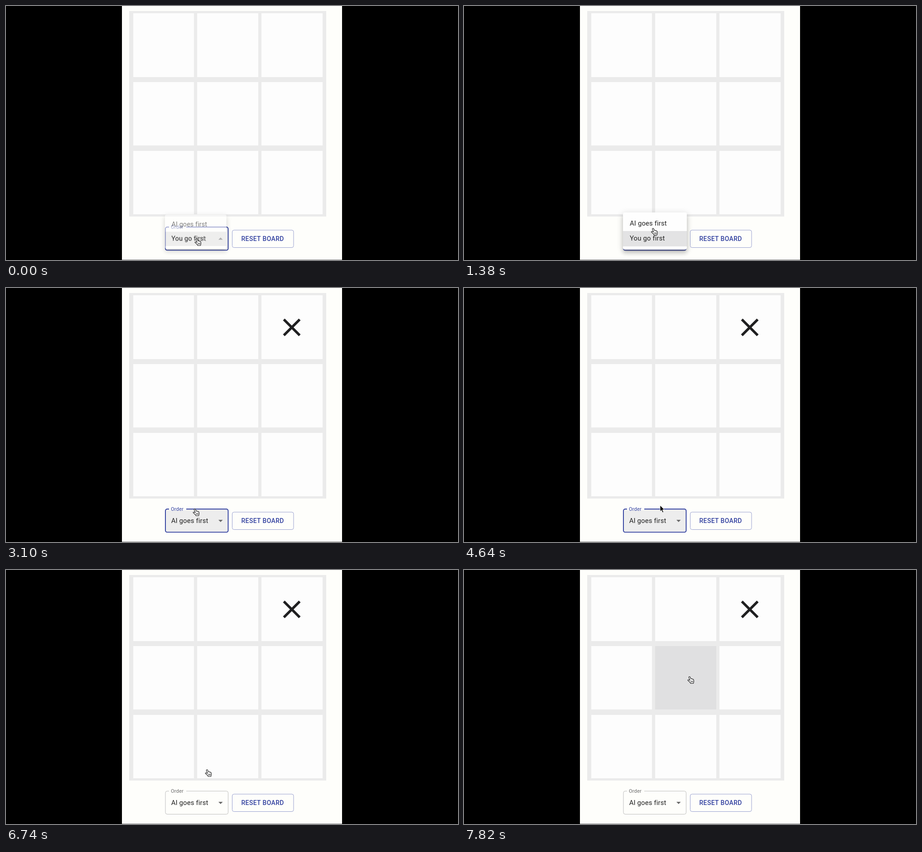
An HTML page for the animation above (8 s loop, 998x561 px).

```html
<!DOCTYPE html>
<html lang="en">
<head>
<meta charset="utf-8">
<title>Tic-tac-toe</title>
<style>
  html, body { margin: 0; width: 100%; height: 100%; overflow: hidden; background: #000; }
  svg { position: absolute; left: 0; top: 0; }
  text, #menu { font: 14.9px Roboto, sans-serif; letter-spacing: .14px; fill: #212121; color: #212121; }
  #label { font-size: 11.15px; letter-spacing: .1px; }
  #reset { font-size: 13.95px; font-weight: 500; letter-spacing: .4px; fill: #303f9f; }
  #menu {
    position: absolute; left: 351px; top: 456px; width: 140.5px; height: 74.5px;
    padding: 7.5px 0 0; box-sizing: border-box; height: 82px;
    background: #fefefe; border-radius: 4px; transform-origin: 0 62px;
    box-shadow: 0 5px 5px -3px rgba(0,0,0,.2), 0 8px 10px 1px rgba(0,0,0,.14), 0 3px 14px 2px rgba(0,0,0,.12);
  }
  #menu div { height: 33.5px; line-height: 33.5px; padding-left: 15px; white-space: nowrap; }
  #menu .selected { background: #e3e3e4; }
</style>
</head>
<body>
<svg width="998" height="561">
  <rect x="256" width="486" height="560" fill="#fefefb"/>
  <rect x="256" y="560" width="486" height="1" fill="#8a8a8a"/>
  <rect x="272" y="11" width="435" height="454" fill="#ebebeb"/>
  <g id="cells"></g>
  <path id="mark" d="M613.5 69.5l35 35m0-35l-35 35" stroke="#1f1f20" stroke-width="5.6"/>
  <rect id="tint" x="352" y="488" width="138.5" height="51.5" rx="4" fill="#ededed"/>
  <path id="outline" fill="none" d="M398 488.3H486.5a4 4 0 0 1 4 4V535.4a4 4 0 0 1-4 4H356a4 4 0 0 1-4-4V492.3a4 4 0 0 1 4-4H360"/>
  <rect x="360" y="486" width="38" height="5" fill="#fefefb"/>
  <text id="label" x="364" y="492">Order</text>
  <text id="choice" x="364.7" y="519.2"></text>
  <path id="caret" fill="#6b6b6b"/>
  <rect x="499.5" y="495" width="135.5" height="38.5" rx="4" fill="none" stroke="#979fcf"/>
  <text id="reset" x="519.5" y="519.2">RESET BOARD</text>
</svg>
<div id="menu"><div>AI goes first</div><div class="selected">You go first</div></div>
<svg width="998" height="561">
  <g id="hand" stroke="#111" stroke-linejoin="round" stroke-linecap="round">
    <path fill="#fff" stroke-width="1.1" d="M.8 0Q-1 0-.5 2L2 8.3-.5 7.3Q-3.6 6.6-2.6 8.6L2.6 13 3 15H9.6L10 13Q11 10.5 10 7Q9.5 5.5 8.2 6Q7.6 4.6 6 5.3Q5.2 4 3.9 4.8L2.4 1Q1.9 0 .8 0Z"/>
    <path fill="none" stroke-width=".8" d="M4 9.5l.5 3M6 9.3l.3 3.2M7.9 9.2l.2 3.3"/>
  </g>
  <path id="arrow" stroke="#fff" stroke-width=".9" d="M0 0V13.5L3 10.7 5.3 16 7.6 15 5.3 10 9.3 9.6Z"/>
</svg>
<script>
const LOOP = 8000, CLOSE = 2200, BLUR = 6220;
const $ = id => document.getElementById(id);
const clamp = v => Math.min(1, Math.max(0, v));

// cubic-bezier(.4, 0, .2, 1)
function ease(x) {
  x = clamp(x);
  let lo = 0, hi = 1;
  for (let i = 0; i < 20; i++) {
    const m = (lo + hi) / 2, n = 1 - m;
    if (1.2 * n * n * m + .6 * n * m * m + m ** 3 < x) lo = m; else hi = m;
  }
  return 3 * (1 - lo) * lo * lo + lo ** 3;
}
const fade = (t, start, length) => ease((t - start) / length);
const mix = (a, b, p) => `rgb(${a.map((v, i) => Math.round(v + (b[i] - v) * p))})`;

const columns = [[281, 134], [422, 135], [564, 135]];
const rows = [[16, 141], [168, 140], [320, 140]];
const cells = rows.flatMap(([y, h]) => columns.map(([x, w]) => {
  const r = document.createElementNS('http://www.w3.org/2000/svg', 'rect');
  Object.entries({ x, y, width: w, height: h, fill: '#fdfdfd' }).forEach(([k, v]) => r.setAttribute(k, v));
  return $('cells').appendChild(r);
}));
const plain = [253, 253, 253], hovered = [224, 224, 225];

// time, x and y of the pointer's tip
const track = [
  [0, 420, 514], [840, 420, 514], [1380, 416.5, 491], [1560, 416, 489], [1820, 416, 488],
  [3920, 416, 488], [4340, 433, 480], [6600, 433, 480], [6740, 443, 441], [6840, 443, 441],
  [7100, 455, 415], [7300, 474, 335], [7400, 490, 257], [7560, 495.5, 240], [7820, 497, 235.5],
  [LOOP, 497, 235.5]
];
function pointer(t) {
  const i = track.findIndex(p => p[0] > t);
  const [t0, x0, y0] = track[i - 1], [t1, x1, y1] = track[i];
  const p = (t - t0) / (t1 - t0);
  return [x0 + (x1 - x0) * p, y0 + (y1 - y0) * p];
}

function drawMenu(t) {
  const open = t < CLOSE, length = 240;
  const alpha = open ? fade(t, -90, length) : 1 - fade(t, CLOSE, length);
  const grow = open ? fade(t, -90, length * .667) : 1 - fade(t, CLOSE + length / 3, length * .667);
  const s = .75 + .25 * grow;
  $('menu').style.opacity = alpha;
  $('menu').style.transform = `scale(${s}, ${s * s})`;
}

function draw(t) {
  const chosen = t >= CLOSE, focused = t < BLUR;
  drawMenu(t);
  $('mark').style.opacity = +chosen;
  $('choice').textContent = chosen ? 'AI goes first' : 'You go first';
  $('caret').setAttribute('d', chosen ? 'M469 512h9.6l-4.8 5z' : 'M469 516.3h9.6l-4.8-5z');
  $('tint').style.opacity = chosen && focused ? 1 : 0;
  $('outline').style.stroke = focused ? '#303f9f' : '#bdbdbd';
  $('outline').style.strokeWidth = focused ? 1.9 : 1;
  $('label').style.fill = mix([48, 63, 159], [108, 108, 108], fade(t, BLUR, 240));
  cells[7].style.fill = mix(plain, hovered, fade(t, 6840, 250) - fade(t, 7335, 250));
  cells[4].style.fill = mix(plain, hovered, fade(t, 7335, 250));

  const [x, y] = pointer(t);
  const onGap = (y > 460 && y < 487) || (y > 308 && y < 320);
  for (const id of ['hand', 'arrow']) {
    $(id).setAttribute('transform', `translate(${x} ${y})`);
    $(id).style.display = (id === 'arrow') === onGap ? '' : 'none';
  }
}

const start = performance.now();
function tick() {
  draw((performance.now() - start) % LOOP);
  requestAnimationFrame(tick);
}
tick();
</script>
</body>
</html>
```
